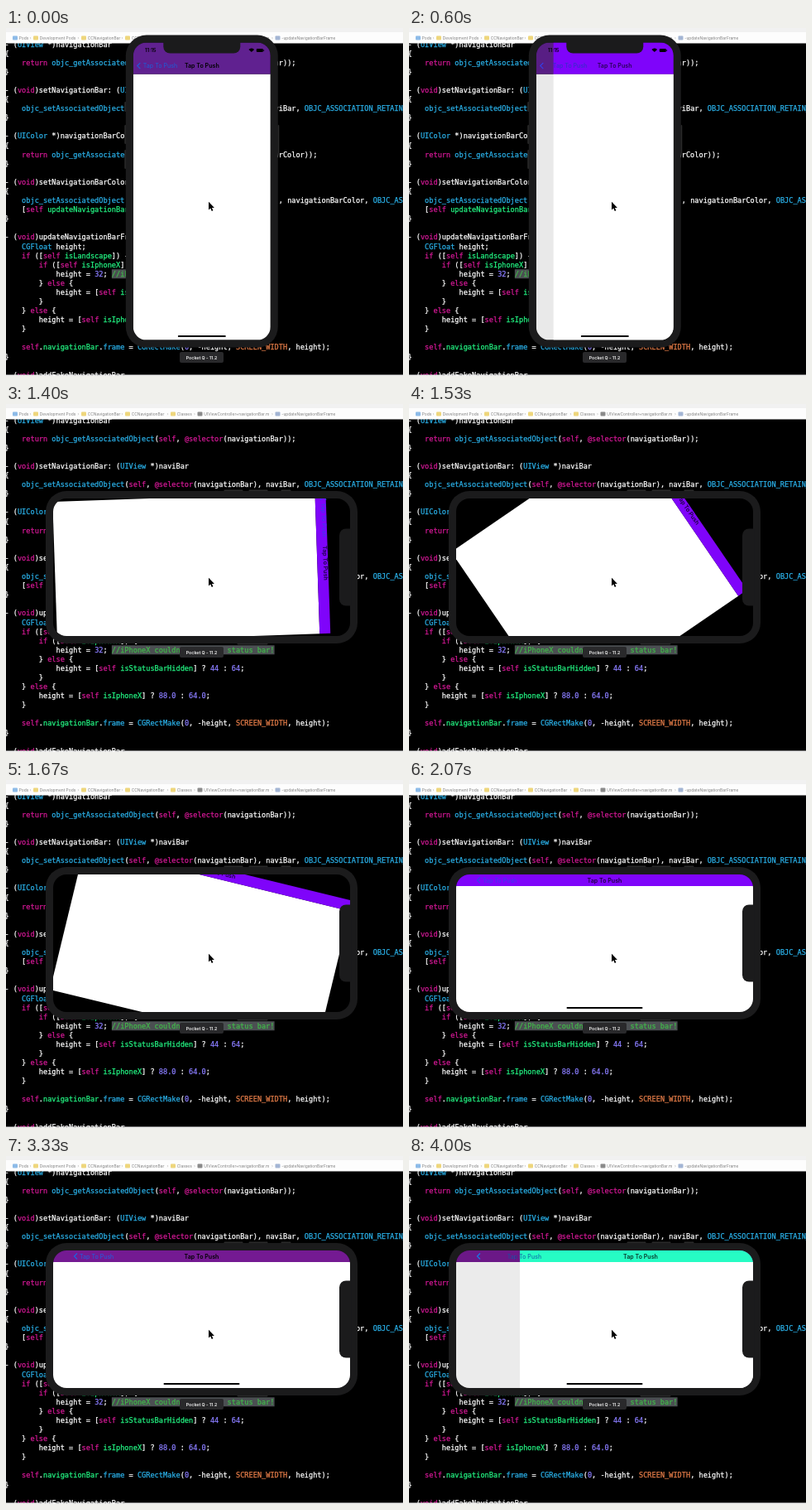
An HTML page with a canvas for the animation above (4.07 s loop, 480 by 420 pixels).

```html
<!DOCTYPE html>
<html lang="en">
<head>
<meta charset="utf-8">
<title>Navigation bar demo</title>
<style>
  html, body { margin: 0; width: 100%; height: 100%; overflow: hidden; background: #000; }
  canvas { display: block; }
</style>
</head>
<body>
<canvas id="stage" width="480" height="420"></canvas>
<script>
const ctx = document.getElementById('stage').getContext('2d');
const LOOP = 4070, FPS = 15;
const SANS = 'Inter, sans-serif';
const MONO = '8.6px "DejaVu Sans Mono", monospace';
const CHAR = 5.178, LINE = 11.09;
const ROTATE_AT = 1365, ROTATE_FOR = 400;

const violet = { fill: '#602190', tint: '#1c5ed8', ink: '#000' };
const bright = { fill: '#7f04fa', tint: '#3440ea', ink: '#1c0040' };
const plum   = { fill: '#741a92', tint: '#1c62e0', ink: '#000' };
const mint   = { fill: '#26fcc4', tint: '#1479e8', ink: '#000' };
const pushes = [
  { at: 420, from: violet, to: bright },
  { at: 2622, from: bright, to: plum },
  { at: 3855, from: plum, to: mint },
];

const code = `- (UIView *)navigationBar
{
    return objc_getAssociatedObject(self, @selector(navigationBar));
}

- (void)setNavigationBar: (UIView *)naviBar
{
    objc_setAssociatedObject(self, @selector(navigationBar), naviBar, OBJC_ASSOCIATION_RETAIN_NONATOMIC);
}

- (UIColor *)navigationBarColor
{
    return objc_getAssociatedObject(self, @selector(navigationBarColor));
}

- (void)setNavigationBarColor: (UIColor *)navigationBarColor
{
    objc_setAssociatedObject(self, @selector(navigationBarColor), navigationBarColor, OBJC_ASSOCIATION_RETAIN_NONATOMIC);
    [self updateNavigationBarFrame];
}

- (void)updateNavigationBarFrame {
    CGFloat height;
    if ([self isLandscape]) {
        if ([self isIphoneX]) {
            height = 32; //iPhoneX couldn't display status bar!
        } else {
            height = [self isStatusBarHidden] ? 44 : 64;
        }
    } else {
        height = [self isIphoneX] ? 88.0 : 64.0;
    }

    self.navigationBar.frame = CGRectMake(0, -height, SCREEN_WIDTH, height);
}

- (void)addFakeNavigationBar`.split('\n');

const syntax = [
  ['comment', /\/\/.*/, '#41b84a'],
  ['keyword', /@selector|\b(?:return|self|void|if|else)\b/, '#d31895'],
  ['member', /(?<=self )\w+|(?<=self\.)\w+/, '#23f583'],
  ['system', /\b(?:UIView|UIColor|CGFloat|CGRectMake|frame|objc_\w+|OBJC_\w+)/, '#2ab0e8'],
  ['macro', /SCREEN_WIDTH/, '#e47c48'],
  ['number', /\b\d+(?:\.\d)?/, '#8a7dff'],
  ['plain', /[^\s\w]|\w+/, '#fff'],
];
const tokens = new RegExp(syntax.map(([name, re]) => `(?<${name}>${re.source})`).join('|'), 'g');

const crumbs = [
  [8, '#8dbbe8', 'Pods'], [33, '#eed67c', 'Development Pods'],
  [91, '#eed67c', 'CCNavigationBar'], [144, '#eed67c', 'CCNavigationBar'],
  [199, '#eed67c', 'Classes'], [231.5, '#8a8a8a', 'UIViewController+navigationBar.m'],
  [325.5, '#a3b5d4', '-updateNavigationBarFrame'],
];

const mix = (a, b, p) => a + (b - a) * p;

function rect(x, y, w, h, fill) {
  ctx.fillStyle = fill;
  ctx.fillRect(x, y, w, h);
}

function pill(x, y, w, h, r, fill) {
  ctx.beginPath();
  ctx.roundRect(x, y, w, h, r);
  ctx.fillStyle = fill;
  ctx.fill();
}

function text(str, x, y, font, fill, align = 'left', alpha = 1, weight = 0) {
  ctx.save();
  ctx.globalAlpha *= alpha;
  ctx.font = font;
  ctx.fillStyle = ctx.strokeStyle = fill;
  ctx.textAlign = align;
  ctx.fillText(str, x, y);
  if (weight) {
    ctx.lineWidth = weight;
    ctx.strokeText(str, x, y);
  }
  ctx.restore();
}

function drawEditor() {
  rect(0, 0, 480, 420, '#000');
  code.forEach((line, row) => {
    const y = 44.7 + (row - 2) * LINE;
    for (const m of line.matchAll(tokens)) {
      const x = -1.6 + m.index * CHAR;
      if (m.groups.comment) rect(x, y - 8.5, m[0].length * CHAR, 11, '#4b4f52');
      const color = syntax.find(([name]) => m.groups[name])[2];
      text(m[0], x, y, MONO, color, 'left', 1, 0.25);
    }
  });
  rect(0, 0, 480, 18.5, '#fdfdfd');
  rect(0, 0, 480, 5, '#f1f1f1');
  rect(0, 418.5, 480, 1.5, '#f0f0f0');
  crumbs.forEach(([x, color, label], i) => {
    if (i) text('›', x - 4.5, 14, `5px ${SANS}`, '#aaa');
    pill(x, 9.5, 6, 5, 1, color);
    text(label, x + 7.7, 14, `4.9px ${SANS}`, '#808080');
  });
}

// Centre-based screen coordinates; p runs from portrait (0) to landscape (1).
function drawContent(p, rotating, push, left) {
  const w = mix(166, 359, p), h = mix(359, 166, p);
  const x0 = -w / 2, top = -h / 2;
  const bar = mix(38, 14, p);
  const barTop = rotating ? top + bar - 13 : top;
  const edge = x0 + w * left;
  const { from, to } = push;

  function page(x, width, fill) {
    rect(x, top + bar, width, h - bar, '#fff');
    rect(x, barTop, width, top + bar - barTop, fill);
  }
  if (left > 0) {
    page(x0, w, from.fill);
    rect(x0, top, w, h, `rgba(0,0,0,${0.1 * (1 - left)})`);
  }
  page(edge, x0 + w - edge, to.fill);

  const y = top + bar - mix(7.5, 4.5, p);
  const backX = x0 + mix(12, 32, p);
  const titleFont = `600 7.1px ${SANS}`, backFont = `7.1px ${SANS}`;
  const label = 'Tap To Push';

  const chevX = x0 + mix(5, 25.5, p);
  ctx.beginPath();
  ctx.moveTo(chevX + 3.5, y - 6);
  ctx.lineTo(chevX, y - 2.5);
  ctx.lineTo(chevX + 3.5, y + 1);
  ctx.strokeStyle = to.tint;
  ctx.lineWidth = 1.2;
  ctx.stroke();

  // The old title slides over to become the back label.
  const shifted = backX + left * w * 0.385;
  text(label, shifted, y, backFont, to.tint, 'left', 1 - left);
  if (left > 0.01) {
    text(label, shifted, y, titleFont, from.ink, 'left', left);
    text(label, backX - (1 - left) * w * 0.3, y, backFont, from.tint, 'left', left * left);
  }
  text(label, left * w * 0.565, y, titleFont, to.ink, 'center', 1 - left);

  if (rotating) return;
  const home = mix(58, 92, p);
  pill(-home / 2, h / 2 - mix(5.5, 6, p), home, 2, 1, '#000');
  if (p === 0) drawStatus();
}

function drawStatus() {
  text('11:15', -62, -168, `600 6.2px ${SANS}`, '#000', 'center');
  ctx.beginPath();
  ctx.moveTo(60, -168);
  ctx.arc(60, -168, 4.5, -Math.PI * 0.77, -Math.PI * 0.23);
  ctx.fillStyle = '#000';
  ctx.fill();
  pill(66, -172, 8, 4, 1, '#000');
  rect(74.5, -171, 0.8, 2, '#000');
}

function drawPhone(t) {
  const landscape = t >= ROTATE_AT;
  const linear = Math.min(1, Math.max(0, (t - ROTATE_AT) / ROTATE_FOR));
  const turn = linear * linear * (3 - 2 * linear);
  const rotating = landscape && linear < 1;
  const started = pushes.filter(push => t >= push.at).pop();
  const push = started || { from: violet, to: violet };
  // Critically damped spring: the share of the slide still to go.
  const u = started ? (t - started.at) / 50 : 20;
  const left = u > 10 ? 0 : (1 + u) * Math.exp(-u);

  ctx.save();
  if (landscape) {
    ctx.translate(236.5, 197);
    ctx.rotate(Math.PI / 2);
  } else {
    ctx.translate(236.8, 197.1);
  }
  for (const [x, y, h] of [[-93.5, -108, 12], [-93.5, -80, 23], [-93.5, -50, 23], [91.5, -80, 37]]) {
    pill(x, y, 2, h, 1, '#2a2a2a');
  }
  pill(-92, -188.5, 184, 377, 25, '#1b1b1c');

  ctx.save();
  ctx.beginPath();
  ctx.roundRect(-83, -179.5, 166, 359, 16);
  ctx.clip();
  rect(-83, -179.5, 166, 359, '#000');
  if (landscape) ctx.rotate(-Math.PI / 2 * turn);
  drawContent(landscape ? turn : 0, rotating, push, left);
  ctx.restore();

  pill(-46.5, -181, 93, 14.5, [0, 0, 8, 8], '#1b1b1c');
  ctx.restore();

  const y = landscape ? 293 : 391;
  pill(210, y, 53, 13, 2, '#29292b');
  text('Pocket Q - 11.2', 236.5, y + 8.8, `600 5.3px ${SANS}`, '#f2f2f2', 'center');
}

function drawCursor() {
  const arrow = new Path2D('M245 209.8v9.8l2.2-2 1.6 3.4 1.6-.8-1.5-3.2h3z');
  ctx.lineWidth = 1;
  ctx.strokeStyle = '#fff';
  ctx.stroke(arrow);
  ctx.fillStyle = '#000';
  ctx.fill(arrow);
}

function frame(now) {
  const step = Math.floor(((now % LOOP) + 5) * FPS / 1000);
  drawEditor();
  drawPhone(step * 1000 / FPS);
  drawCursor();
  requestAnimationFrame(frame);
}
requestAnimationFrame(frame);
</script>
</body>
</html>
```
